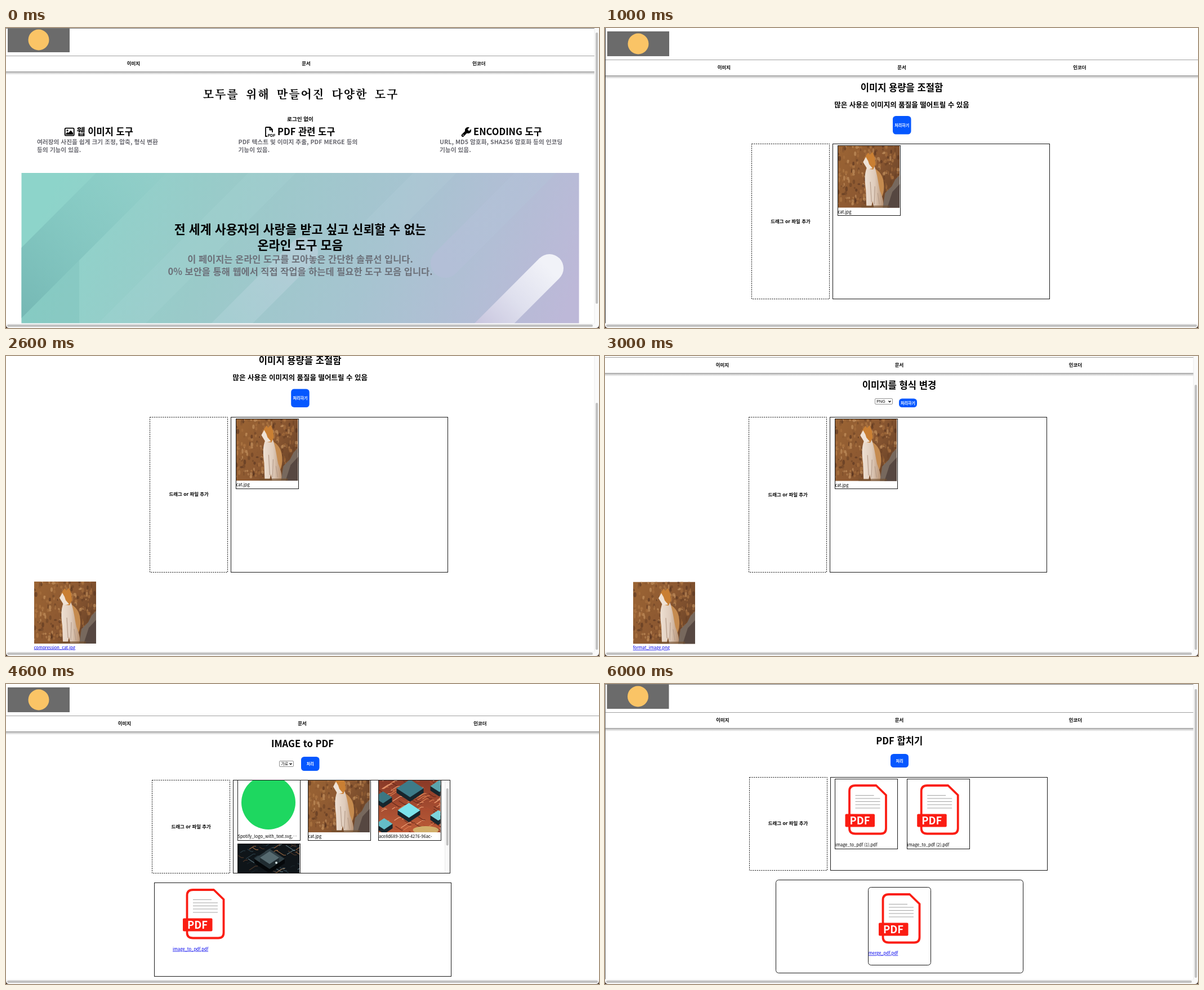
An HTML page that plays this animation: 1053x532 px, repeating every 7000 ms.

```html
<!DOCTYPE html>
<html lang="ko">
<head>
<meta charset="utf-8">
<title>온라인 도구 모음</title>
<style>
html, body { margin: 0; width: 100%; height: 100%; overflow: hidden; background: #fff; }
#stage { display: block; width: 1053px; height: 532px; }
text { font-family: "Noto Sans CJK KR", "Noto Sans CJK JP", "Noto Sans CJK", sans-serif; white-space: pre; }
.mono { font-family: "DejaVu Sans Mono", monospace; }
.ui { font-family: "Liberation Sans", sans-serif; }
.brush { font-family: "Noto Serif CJK KR", "Noto Sans CJK KR", "Noto Sans CJK", serif; letter-spacing: 1.9px; word-spacing: 4.5px; }
</style>
</head>
<body>
<svg id="stage" viewBox="0 0 1053 532" xmlns="http://www.w3.org/2000/svg"></svg>
<script>
const BLUE = '#0557ff', RED = '#fb1d13', BODY = 7.55, TITLE = 16.6;

const snap = v => Math.floor(v) + 0.5;
const rect = (x, y, w, h, fill, extra = '') =>
  `<rect x="${x}" y="${y}" width="${w}" height="${h}" fill="${fill}" ${extra}/>`;
// One-pixel outline on whole pixels
const frame = (x, y, w, h, extra = '') =>
  rect(snap(x), snap(y), Math.round(w), Math.round(h), 'none', `stroke="#1a1a1a" stroke-width="1" ${extra}`);
const path = (d, fill, extra = '') => `<path d="${d}" fill="${fill}" ${extra}/>`;
const line = (d, color, width, extra = '') =>
  path(d, 'none', `stroke="${color}" stroke-width="${width}" ${extra}`);
const use = (id, x, y) => `<use href="#${id}" x="${x}" y="${y}" width="110" height="110"/>`;
const text = (s, x, y, size, extra = '') =>
  `<text x="${x}" y="${y}" font-size="${size}" ${extra}>${s}</text>`;
const bold = (s, x, y, size, extra = '') => text(s, x, y, size, `font-weight="700" ${extra}`);
// Centred on both axes
const label = (s, x, y, size, extra = '') =>
  bold(s, x, y + size * 0.37, size, `text-anchor="middle" ${extra}`);
const link = (s, x, y) => text(s, x, y, BODY, 'fill="#0000ee" text-decoration="underline"');

function random(seed) {
  return () => (seed = (seed * 16807) % 2147483647) / 2147483647;
}

function leaves() {
  const rnd = random(77), colors = ['#a8713f', '#6b4226', '#c99763', '#8a5931', '#583520', '#b57d48'];
  return Array.from({ length: 260 }, () => {
    const x = rnd() * 110, y = rnd() * 105, color = colors[Math.floor(rnd() * 6)];
    return `<ellipse cx="${x.toFixed(1)}" cy="${y.toFixed(1)}" rx="${(1 + rnd() * 1.8).toFixed(1)}" ry="${(1.5 + rnd() * 3).toFixed(1)}" fill="${color}" opacity=".6"/>`;
  }).join('');
}

function traces(colors, count, seed) {
  const rnd = random(seed);
  return Array.from({ length: count }, (_, i) => {
    const x = Math.round(rnd() * 110), y = Math.round(rnd() * 110), n = Math.round(4 + rnd() * 10);
    return line(`M${x} ${y}l${n} ${i % 2 ? n * 0.65 : -n * 0.65}h4`, colors[i % colors.length], 1.1);
  }).join('');
}

function chip(x, y, w, top, side = '#17262d') {
  const h = w * 0.66;
  return path(`M${x - w} ${y}v8l${w} ${h}l${w} ${-h}v-8z`, side) +
    path(`M${x - w} ${y}l${w} ${-h}l${w} ${h}l${-w} ${h}z`, top);
}

const symbol = (id, body) => `<symbol id="${id}" viewBox="0 0 110 110">${body}</symbol>`;
const gradient = (id, coords, ...stops) =>
  `<linearGradient id="${id}" gradientUnits="userSpaceOnUse" ${coords}>` +
  stops.map(([at, color, alpha = 1]) => `<stop offset="${at}" stop-color="${color}" stop-opacity="${alpha}"/>`).join('') +
  '</linearGradient>';

const defs = '<defs>' +
  gradient('autumn', 'x1="0" y1="0" x2="110" y2="60"', [0, '#9c6534'], [0.6, '#8c5831'], [1, '#6d4529']) +
  gradient('fur', 'x1="48" y1="0" x2="80" y2="0"', [0, '#eee0d3'], [0.55, '#dfccbc'], [1, '#bb9779']) +
  gradient('copper', 'x1="0" y1="0" x2="0" y2="110"', [0, '#7f3324'], [1, '#bd5c38']) +
  gradient('shade', 'x1="0" y1="0" x2="0" y2="5"', [0, '#000', 0.28], [1, '#000', 0]) +
  gradient('sky', 'x1="100" y1="240" x2="960" y2="590"', [0, '#8dd4ca'], [0.33, '#9acac9'], [0.62, '#a6c4d0'], [0.82, '#b2bed5'], [1, '#bdb8d8']) +
  gradient('teal', 'x1="40" y1="510" x2="290" y2="260"', [0, '#76b9b5'], [1, '#85c8c3', 0.1]) +
  gradient('pale', 'x1="530" y1="390" x2="400" y2="520"', [0, '#bccfdc', 0.7], [1, '#b4d6dc', 0.4]) +
  gradient('slate', 'x1="780" y1="418" x2="940" y2="258"', [0, '#b3bfd7'], [1, '#b3c3d8', 0.4]) +
  gradient('white', 'x1="965" y1="427" x2="850" y2="542"', [0, '#f1f2f8'], [0.5, '#dfe0ee'], [1, '#c8c5de']) +
  '<clipPath id="banner"><rect x="27.5" y="257" width="990" height="267"/></clipPath>' +
  '<clipPath id="files"><rect x="404" y="171" width="384" height="164.5"/></clipPath>' +
  symbol('cat',
    rect(0, 0, 110, 110, 'url(#autumn)') + leaves() +
    path('M80 110L84 84L96 72L102 60L110 52V110z', '#77685d') +
    path('M88 110L97 82L110 68V110z', '#564741') +
    path('M64 40C74 44 81 54 82 68Q83 82 78 92L68 92z', '#c58b4f') +
    path('M52 38C47 50 48 64 50 78L51 107H60L62 98L64 109H80C83 100 79 90 75 80C72 66 70 48 65 36z', 'url(#fur)') +
    path('M46 28L50 18L54 12L57 16L62 11L66 22L67 33L63 42L53 41z', '#c97f33') +
    path('M45 29L50 20L54 27L56 33L62 40L53 42z', '#efe2d5') +
    line('M58 64L60 100M66 72L65 104M71 84L74 104', '#b59c8a', 1.2) +
    rect(42, 106, 50, 4, '#73502f', 'opacity=".6"')) +
  symbol('board',
    rect(0, 0, 110, 110, 'url(#copper)') + traces(['#dd8052', '#672a1b', '#eea278', '#b04d30'], 130, 31) +
    chip(8, 48, 16, '#3c7782') + chip(108, 28, 16, '#5ba4ad') +
    chip(56, 32, 24, '#3d7b88') + chip(54, 71, 20, '#7ce3ec') +
    chip(106, 80, 14, '#7dd5dc') + chip(10, 95, 15, '#64bec8') +
    '<ellipse cx="84" cy="106" rx="23" ry="7" fill="#d8c377" opacity=".8"/>') +
  symbol('processor',
    rect(0, 0, 110, 110, '#0f1519') + traces(['#4f3728', '#2b3f48', '#9a6842', '#182329', '#587079'], 90, 12) +
    chip(57, 27, 27, '#303f45', '#05080a') + chip(57, 25, 17, '#566a70', '#202c31') +
    '<circle cx="69" cy="34" r="2" fill="#d5e2e2"/>') +
  symbol('brand', rect(0, 0, 110, 110, '#fff') + '<circle cx="55" cy="57" r="48" fill="#1ed760"/>') +
  symbol('pdf',
    line('M36 12H73L90.5 29V88Q90.5 97.5 81 97.5H36Q25.5 97.5 25.5 88V22Q25.5 12 36 12z', RED, 3.8, 'stroke-linejoin="round"') +
    line('M36 29.5H69M36 35H80M36 40.5H80M36 46H80M36 52H80', '#999', 0.9) +
    rect(18, 62.5, 52.5, 23, RED, 'rx="2"') +
    bold('PDF', 44, 80.7, 18.3, 'fill="#fff" text-anchor="middle"')) +
  '</defs>';

function header(x, y, columns, width) {
  const rule = snap(y + 50);
  return rect(x, y, 110, 44, '#6b6b6b') +
    `<circle cx="${x + 55}" cy="${y + 22}" r="18.5" fill="#fac466"/>` +
    line(`M0 ${rule}H${width}M0 ${rule + 28}H${width}`, '#a0a0a0', 1) +
    `<g transform="translate(0 ${rule + 28.5})">${rect(0, 0, width, 5, 'url(#shade)')}</g>` +
    ['이미지', '문서', '인코더'].map((s, i) => label(s, columns[i], rule + 13.2, 8.45)).join('');
}

// Window scrollbars; without a vertical range only the bottom bar shows
function scrollbars(top, bottom) {
  const vertical = top !== undefined;
  return rect(0, 523.5, 1053, 8.5, '#f8f8f8') +
    (vertical ? rect(1045, 0, 8, 532, '#fafafa') + line('M1045 0V524', '#e6e6e6', 0.8) +
      rect(1047, top, 4.2, bottom - top, '#c1c1c1', 'rx="2.1"') : '') +
    rect(2, 525.8, vertical ? 1040 : 1049, 4.2, '#c1c1c1', 'rx="2.1"') +
    path('M0 526V532H6Q0 532 0 526zM1053 526V532H1047Q1053 532 1053 526z', '#3b2c26');
}

const button = (s, x, y, w, h, size = 7.06) =>
  rect(x, y, w, h, BLUE, 'rx="5.5"') + label(s, x + w / 2, y + h / 2, size, 'fill="#fff"');

const select = (s, x, y, w, cls) =>
  rect(x, y, w, 10, '#fff', 'stroke="#767676" stroke-width=".8" rx="1.5"') +
  text(s, x + 2.8, y + 7.6, 7.1, `class="${cls}"`) +
  line(`M${x + w - 7} ${y + 4}l2 2.2l2 -2.2`, '#111', 1.3);

const dropZone = (x, y, h) =>
  frame(x, y, 138, h, 'stroke-dasharray="2.2 1.6"') +
  label('드래그 or 파일 추가', x + 69, y + h / 2 - 0.6, 8.45) +
  frame(x + 144, y, 384.5, h);

const thumb = (id, name, x, y) =>
  use(id, x, y) + frame(x, y, 110.5, 124) + text(name, x + 0.4, y + 120, BODY);

const compressPage = (x, y) =>
  label('이미지 용량을 조절함', x, y, TITLE) +
  label('많은 사용은 이미지의 품질을 떨어트릴 수 있음', x, y + 30.5, 12.5) +
  button('처리하기', x - 16, y + 50.5, 32.5, 32.5) +
  dropZone(x - 266.5, y + 100, 275) +
  thumb('cat', 'cat.jpg', x - 113.8, y + 103.2);

const capsule = (x1, y1, x2, y2, width, paint) =>
  line(`M${x1} ${y1}L${x2} ${y2}`, `url(#${paint})`, width, 'stroke-linecap="round"');

function banner() {
  return `<g clip-path="url(#banner)">` +
    rect(27, 257, 991, 268, 'url(#sky)') +
    path('M27 390L160 257H285L27 515z', 'url(#teal)') +
    path('M27 515L130 412V524H27z', '#76b9b5', 'opacity=".35"') +
    path('M163 524L430 257H515L248 524z', '#a9d9d8', 'opacity=".18"') +
    capsule(528, 397, 380, 545, 52, 'pale') +
    path('M620 360L723 257H800L697 360z', '#b9cfdb', 'opacity=".2"') +
    capsule(780, 417, 960, 237, 52, 'slate') +
    capsule(965, 426, 845, 546, 50, 'white') +
    '</g>';
}

function homePage() {
  const feature = (title, titleX, x, lines) =>
    bold(title, titleX, 190, 16.5) +
    lines.map((s, i) => bold(s, x, 206 + i * 14, 10.7, 'fill="#68686f"')).join('');
  const pictureIcon =
    rect(104.7, 177.7, 16, 13, 'none', 'rx="1.8" stroke="#000" stroke-width="1.8"') +
    '<circle cx="109" cy="181.8" r="1.6"/>' + path('M106.5 189V187L109.5 184.5L111 186L115 181.5L119 186V189z', '#000');
  const fileIcon =
    line('M464 192H461V177Q461 176 462 176H469L473 180V185M468.5 176V180.5H473', '#000', 1.8) +
    text('PDF', 464.8, 192.8, 6.8, 'class="ui" font-weight="700"');
  const wrenchIcon =
    line('M811 190.5L819 182.5', '#000', 4.8, 'stroke-linecap="round"') +
    path('M823 176.2L819.5 179.7V182.5H822.5L825.8 179.2Q827 184 823.5 186.3Q820 188 816.5 185.5Q813.5 181.5 816 178Q819 175 823 176.2z', '#000') +
    '<circle cx="811.7" cy="190" r=".9" fill="#fff"/>';
  return header(3, -1, [226.5, 533, 840], 1045) + line('M0 .5H1053', '#777', 1) +
    text('모두를 위해 만들어진 다양한 도구', 523.5, 125, 20, 'class="brush" font-weight="600" text-anchor="middle"') +
    label('로그인 없이', 522.5, 161.3, 9.6) +
    pictureIcon + feature('웹 이미지 도구', 125.5, 55, ['여러장의 사진을 쉽게 크기 조정, 압축, 형식 변환', '등의 기능이 있음.']) +
    fileIcon + feature('PDF 관련 도구', 482, 412.5, ['PDF 텍스트 및 이미지 추출, PDF MERGE 등의', '기능이 있음.']) +
    wrenchIcon + feature('ENCODING 도구', 830, 770, ['URL, MD5 암호화, SHA256 암호화 등의 인코딩', '기능이 있음.']) +
    banner() +
    label('전 세계 사용자의 사랑을 받고 싶고 신뢰할 수 없는', 522.5, 357, 21.7) +
    label('온라인 도구 모음', 522.5, 385, 21.7) +
    label('이 페이지는 온라인 도구를 모아놓은 간단한 솔류선 입니다.', 522.5, 410.3, 16.45, 'fill="#6c7079"') +
    label('0% 보안을 통해 웹에서 직접 작업을 하는데 필요한 도구 모음 입니다.', 522.5, 432, 16.45, 'fill="#6c7079"') +
    scrollbars(8, 489);
}

function textArea(y, content) {
  return rect(290.2, y, 472, 129.5, '#fff', 'rx="2.5" stroke="#1a62e8" stroke-width="1.5"') +
    text(content, 291.5, y + 11.8, 10.54, 'class="mono"');
}

const pages = [
  homePage(),

  header(4, 6, [211.5, 527, 843], 1053) + compressPage(527, 105.5) +
    line('M.5 0V528', '#333', 1) + scrollbars(),

  compressPage(522.2, 8) + use('cat', 50, 400) +
    link('compression_cat.jpg', 49.7, 519.5) + scrollbars(83, 521),

  header(3, -48, [208.5, 522.5, 835.5], 1045) +
    label('이미지를 형식 변경', 522.5, 52, TITLE) +
    select('PNG', 479.5, 75.5, 31, 'ui') + button('처리하기', 522, 75.5, 32, 15.5) +
    dropZone(255.7, 108.5, 275) + thumb('cat', 'cat.jpg', 408.2, 111.7) +
    use('cat', 50, 400.5) + link('format_image.png', 49.7, 520) + scrollbars(51, 521),

  header(3, 6, [210.5, 526, 842], 1053) +
    label('IMAGE to PDF', 526.5, 105.5, TITLE) +
    select('가로', 485.5, 136.5, 25, '') + button('처리', 524, 129, 32.5, 25) +
    `<g clip-path="url(#files)">` +
    thumb('brand', 'Spotify_logo_with_text.svg,⋯', 411, 153) +
    thumb('cat', 'cat.jpg', 536, 153) +
    thumb('board', 'ace8d689-303d-4276-96ac-', 661.5, 153) +
    thumb('processor', '', 411, 283) +
    rect(779.5, 171, 8, 165, '#fafafa') + line('M779.5 171V336', '#e5e5e5', 0.8) +
    rect(781.7, 185, 4.2, 101.5, '#c1c1c1', 'rx="2.1"') + '</g>' +
    dropZone(259.7, 170.5, 165) + frame(263, 352.5, 527, 165.5) +
    use('pdf', 296, 353) + link('image_to_pdf.pdf', 296, 472.8) + scrollbars(),

  header(2.5, 6.5, [227.5, 537, 846], 1053) + line('M0 .5H1053', '#777', 1) +
    label('SHA-256 암호화', 526, 106.5, TITLE) +
    textArea(130.2, 'abcdefg') +
    line('M292 143H336', '#f05a50', 1.1, 'stroke-dasharray="1.1 1"') +
    button('변환', 507, 274.5, 38, 26.5, 9.8) +
    textArea(313.2, '7d1a54127b222502f5b79b5fb0803061152a44f92b37e23c6527baf665d4da9a') +
    scrollbars(),

  header(3.5, 0, [209, 522.5, 835.5], 1045) + line('M0 .5H1053M.5 0V528', '#777', 1) +
    label('PDF 합치기', 522.7, 100.5, TITLE) + button('처리', 507, 124, 32, 24) +
    dropZone(256, 165, 165) +
    thumb('pdf', 'image_to_pdf (1).pdf', 408.5, 168) +
    thumb('pdf', 'image_to_pdf (2).pdf', 536.2, 168) +
    frame(303.5, 347, 439, 165, 'rx="5"') + frame(467.7, 360.5, 110.5, 138, 'rx="5"') +
    use('pdf', 468, 361) + link('merge_pdf.pdf', 468, 480.3) + scrollbars(9, 521)
];

const stage = document.getElementById('stage');
stage.innerHTML = defs + pages.map(body => `<g class="page" display="none">${body}</g>`).join('');
const groups = [...stage.querySelectorAll('.page')];

function render() {
  const current = Math.floor(performance.now() / 1000) % groups.length;
  groups.forEach((g, i) => g.setAttribute('display', i === current ? 'inline' : 'none'));
  requestAnimationFrame(render);
}
render();
</script>
</body>
</html>
```
